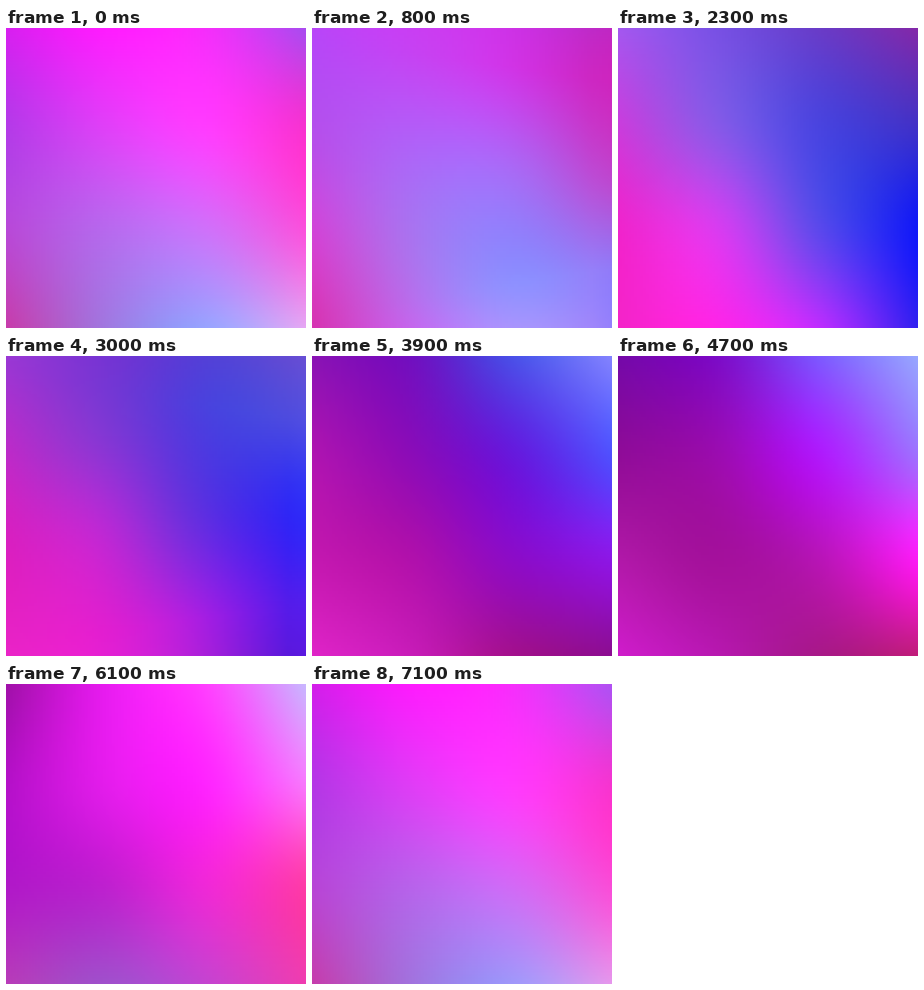
These frames come from a looping animation (300x300 px, 7.2 s). An HTML page with a canvas:

```html
<!DOCTYPE html>
<html>
<head>
<meta charset="utf-8">
<style>
html, body { margin: 0; width: 100%; height: 100%; overflow: hidden; background: #c030e0; }
canvas { display: block; width: 300px; height: 300px; }
</style>
</head>
<body>
<canvas id="stage" width="300" height="300"></canvas>
<script>
const LOOP = 7200, STEP = 100, SIZE = 100;

// Gradient meshes: 4 x 4 control colours, blended over time while drifting up and left.
const mesh = (time, ...rows) => ({
  time,
  points: rows.join(' ').split(' ').map(c => [0, 2, 4].map(i => parseInt(c.slice(i, i + 2), 16)))
});

const keys = [
  mesh(0,
    'd81ff0 ff1cff f52dfb a84cf0',
    'b43ae8 e040f8 ff3cff f832d0',
    'b848d8 b868ee d070fa fc50dc',
    'c83caa a078e0 98a4ff e6a8f4'),
  mesh(1500,
    'a064ff a050e8 a82cd0 a414a8',
    'b85cee 9070fa 7c68f0 8c2cb8',
    'e83ed8 a874f4 6c78ff 3c4cff',
    'e428b4 fc4cfa d88cf8 4c58ff'),
  mesh(2300,
    'a458f0 7850e4 6a3cc8 8428a8',
    'cc3cdc 8858e8 4a44e0 4030c8',
    'f024cc d83cf0 5c48ec 1018f8',
    'f424c8 ff24e8 c02cff 3020f0'),
  mesh(3900,
    '8a12b4 7010c0 4a50e8 8484ff',
    'b014b0 8c0cb8 6818dc 5050ff',
    'c418b0 b010ac 8c0cc8 8c18e8',
    'e024c8 c81cb8 a4108c 8c0c90'),
  mesh(4700,
    '7408a8 7c0cc8 7c58ff 98a8ff',
    '900c98 9c0cb0 b018fa a070ff',
    'b018a8 a4109c b814b8 fc1cf8',
    'd01ccc b818b0 a81888 c01c78'),
  mesh(6100,
    'a010a8 e81cf0 ff40ff c8b8ff',
    'b410c8 e41cec ff24ff f878fc',
    'b018c8 c020d0 f028d8 ff3ca8',
    'b83cb8 a050cc c444d0 f03cb0')
];

const clamp = (v, lo, hi) => Math.max(lo, Math.min(hi, v));

// Catmull-Rom weights folded onto the four mesh columns or rows.
function weights(pos) {
  const p = clamp(pos, 0, 1) * 3;
  const i = Math.min(2, Math.floor(p)), f = p - i, g = f * f, h = g * f;
  const w = [0, 0, 0, 0];
  const add = (n, v) => {
    if (n < 0) { w[0] += 2 * v; w[1] -= v; }
    else if (n > 3) { w[3] += 2 * v; w[2] -= v; }
    else w[n] += v;
  };
  add(i - 1, (-h + 2 * g - f) / 2);
  add(i, (3 * h - 5 * g + 2) / 2);
  add(i + 1, (-3 * h + 4 * g + f) / 2);
  add(i + 2, (h - g) / 2);
  return w;
}

function addSample(out, points, x, y, amount) {
  const wx = weights(x), wy = weights(y);
  for (let r = 0; r < 4; r++) {
    for (let c = 0; c < 4; c++) {
      const k = wx[c] * wy[r] * amount, p = points[r * 4 + c];
      out[0] += p[0] * k;
      out[1] += p[1] * k;
      out[2] += p[2] * k;
    }
  }
}

const ctx = document.getElementById('stage').getContext('2d');
const small = document.createElement('canvas');
small.width = small.height = SIZE;
const smallCtx = small.getContext('2d');
const image = smallCtx.createImageData(SIZE, SIZE);
ctx.imageSmoothingEnabled = true;

function draw(t) {
  let n = keys.length - 1;
  while (keys[n].time > t) n--;
  const a = keys[n], b = keys[(n + 1) % keys.length];
  const end = n + 1 < keys.length ? b.time : LOOP;
  const past = (t - a.time) / 1000, left = (end - t) / 1000;
  const mix = past / (past + left);
  const rgb = [0, 0, 0];

  for (let j = 0; j < SIZE; j++) {
    for (let i = 0; i < SIZE; i++) {
      const x = (i + 0.5) / SIZE, y = (j + 0.5) / SIZE;
      const flow = 0.2 + 0.8 * x;
      const vx = -0.09 * flow, vy = -0.25 * flow;
      rgb.fill(0);
      addSample(rgb, a.points, x - vx * past, y - vy * past, 1 - mix);
      if (mix > 0) addSample(rgb, b.points, x + vx * left, y + vy * left, mix);
      const o = (j * SIZE + i) * 4;
      for (let c = 0; c < 3; c++) image.data[o + c] = rgb[c];
      image.data[o + 3] = 255;
    }
  }
  smallCtx.putImageData(image, 0, 0);
  ctx.drawImage(small, 0, 0, 300, 300);
}

const start = performance.now();
let shown = -1;
function tick() {
  const t = Math.floor((performance.now() - start) / STEP) * STEP % LOOP;
  if (t !== shown) draw(shown = t);
  requestAnimationFrame(tick);
}
tick();
</script>
</body>
</html>
```
